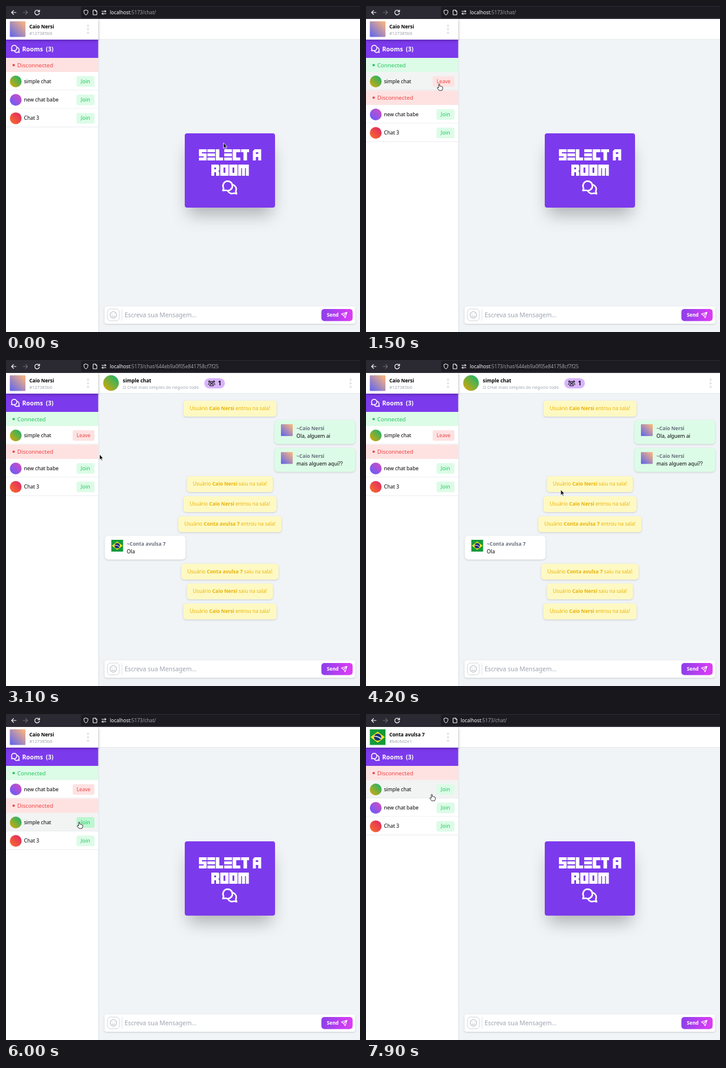
These frames come from a looping animation (600x553 px, 8 s). An HTML page:

```html
<!DOCTYPE html>
<html lang="pt">
<head>
<meta charset="utf-8">
<title>Chat rooms</title>
<style>
html, body { margin: 0; width: 100%; height: 100%; overflow: hidden; background: #f1f5f8 }
svg { display: block; width: 100vw; height: 100vh; font-family: "Noto Sans", "Open Sans", sans-serif }
.b { font-weight: 700 }
.m { font-weight: 500 }
.mid { text-anchor: middle }
.line { fill: none; stroke-linecap: round; stroke-linejoin: round }
.raised { filter: drop-shadow(0 1px 1.5px rgba(0,0,0,.16)) }
.side { filter: drop-shadow(.5px 0 1.5px rgba(0,0,0,.16)) }
.over { filter: drop-shadow(0 2px 2.5px rgba(0,0,0,.25)) }
.glow { filter: blur(14px) }
</style>
</head>
<body>
<svg viewBox="0 0 600 553" preserveAspectRatio="none">
  <defs id="defs"></defs>
  <g id="scene"></g>
  <g id="cursor"></g>
</svg>
<script>
const $ = id => document.getElementById(id);
const LOOP = 8000, STEP = 100;
const GREEN = '#22c55e', MINT = '#dcfce7', RED = '#ef4444', PINK = '#fee2e2';
const GRAY = '#9ca3af', VIOLET = '#7c3aed', YELLOW = '#eab308';

const users = {
  caio: { name: 'Caio Nersi', id: '#127385b6' },
  conta: { name: 'Conta avulsa 7', id: '#b4c6d2e1' }
};
const rooms = {
  simple: { name: 'simple chat', about: 'O CHat mais simples do negocio todo', hash: '644eb9a0f05e841758cf7f25', pill: 336 },
  babe: { name: 'new chat babe', about: 'O mais novo chat do bagulho todo', hash: '6473cc69af9306aecf5c79ea', pill: 326 },
  third: { name: 'Chat 3' }
};

// [start, user, joined room, open room]
const states = [
  [0, 'caio'], [1200, 'caio', 'simple'], [2700, 'caio', 'simple', 'simple'],
  [4900, 'caio'], [5500, 'caio', 'babe'], [6500, 'caio', 'babe', 'babe'], [7400, 'conta']
];

// pointer stops: [time, x, y]
const stops = [
  [0, 368.5, 232], [200, 368.5, 232], [1000, 133, 128], [1300, 133, 128], [1500, 124, 132],
  [1800, 124, 132], [2100, 210, 198], [2500, 62, 127], [2700, 62, 127], [3100, 158.5, 160],
  [3500, 260, 230], [3900, 420, 342], [4200, 330, 220], [4600, 135, 128], [4900, 135, 128],
  [5300, 133, 157], [5600, 133, 157], [6000, 124, 183], [6300, 60, 127], [6500, 60, 127],
  [7000, 428.5, 202], [7300, 428.5, 202], [7400, 290, 190], [7900, 111.5, 136], [8000, 111.5, 136]
];

const rect = (x, y, w, h, fill, r = 0, cls = '') =>
  `<rect x="${x}" y="${y}" width="${w}" height="${h}" rx="${r}" fill="${fill}" class="${cls}"/>`;
const circle = (x, y, r, fill) => `<circle cx="${x}" cy="${y}" r="${r}" fill="${fill}"/>`;
const text = (x, y, s, size, fill, cls = '') =>
  `<text x="${x}" y="${y}" font-size="${size}" fill="${fill}" class="${cls}">${s}</text>`;
const line = (d, color, width = 1.2) => `<path class="line" d="${d}" stroke="${color}" stroke-width="${width}"/>`;
const at = (x, y, s, body) => `<g transform="translate(${x} ${y}) scale(${s})">${body}</g>`;
const bold = s => `<tspan class="b">${s}</tspan>`;

const gradient = (id, from, to, y1 = 1) =>
  `<linearGradient id="${id}" x1="0" y1="${y1}" x2="1" y2="0"><stop offset=".1" stop-color="${from}"/><stop offset=".9" stop-color="${to}"/></linearGradient>`;
$('defs').innerHTML = gradient('simple', '#cfa80c', '#1fb468') + gradient('babe', '#6a5cfa', '#cf4cc4') +
  gradient('third', '#f9692b', '#e02b62') + gradient('caio', '#6a6ae6', '#f2b183') +
  gradient('send', '#9340ea', '#d83cf5', 0);

const bubbles = (x, y, s) => at(x, y, s,
  line('M1.3 17 2.6 13.2A8 8 0 1 1 6.6 16.6ZM19 7.4A8 8 0 0 1 23.2 18.4L24.6 22.4 20 21.5A8 8 0 0 1 9.8 18', '#fff', 2.6));

const dots = x => [33.5, 39.5, 45.5].map(y => circle(x, y, 1.9, '#e3e4e8')).join('');

const flag = rect(0, 0, 20, 20, '#149a3a') + '<path d="M.8 10 10 3 19.2 10 10 17Z" fill="#fbe122"/>' +
  circle(10, 10, 4.6, '#18307c') + line('M6 9Q10 8.5 14 11.8', '#fff', 1);
const portrait = (who, x, y, size) =>
  at(x, y, size / 20, who === 'conta' ? flag : rect(0, 0, 20, 20, 'url(#caio)', 1));

function toolbar(user, open) {
  const x = user === 'caio' ? 176 : 160.5, ink = '#fbfbfe';
  return rect(0, 0, 600, 22, '#2b2a33') + rect(127, 1, 480, 19, '#1c1b22', 3) +
    line('M17 11H9.5M12.8 7.7 9.5 11 12.8 14.3', ink) +
    line('M29 11H36.5M33.2 7.7 36.5 11 33.2 14.3', '#6c6b74') +
    line('M56 8.6A4 4 0 1 0 56.7 12M56.9 6.8V9.6H54', ink) +
    line('M135.5 6.8 139 8.2C139 12 138 14 135.5 15.2 133 14 132 12 132 8.2Z', ink, 1) +
    line('M148 7H152L154 9V15H148ZM152 7V9H154', ink, 1) +
    (user === 'caio' ? line('M162.5 9H169.5M167.5 7.5 169.5 9 167.5 10.5M169.5 13H162.5M164.5 11.5 162.5 13 164.5 14.5', ink, 1) : '') +
    text(x, 13.7, `localhost<tspan fill="#a3a2aa">:5173/chat/${open ? rooms[open].hash : ''}</tspan>`, 8.2, ink);
}

// Rows of the side list with their tops
function layout(joined) {
  const rest = Object.keys(rooms).filter(k => k !== joined);
  const top = joined ? 168 : 112;
  return [...(joined ? [{ key: joined, y: 112, on: true }] : []),
    ...rest.map((key, i) => ({ key, y: top + i * 31.2 }))];
}

function strip(y, on) {
  const ink = on ? GREEN : RED;
  return rect(0, y, 156.3, 24.5, on ? MINT : PINK) + circle(13, y + 12.2, 2, ink) +
    text(19, y + 15.7, on ? 'Connected' : 'Disconnected', 9.6, ink, 'm');
}

function row({ key, y, on }, x, py) {
  const hover = x < 156 && py >= y && py < y + 31;
  const inButton = hover && x > 119 && x < 150 && py > y + 7 && py < y + 25;
  const [bx, w] = on ? [113, 37] : [119.5, 30.5];
  return rect(0, y, 156.3, 31.2, hover ? '#f2f3f3' : '#fff') + rect(0, y + 30.4, 156.3, .8, '#e5e7eb') +
    circle(16.5, y + 16, 10, `url(#${key})`) + text(30.5, y + 19, rooms[key].name, 8.55, '#000', 'm') +
    rect(bx, y + 7, w, 18, on ? PINK : inButton ? '#bbf7d0' : MINT, 3) +
    text(bx + w / 2, y + 19, on ? 'Leave' : 'Join', on ? 8.6 : 9, on ? RED : GREEN, 'm mid');
}

function sidebar(user, joined, x, y) {
  const u = users[user];
  return `<g class="side">${rect(0, 22, 156.3, 531, '#fff')}</g>` +
    rect(0, 56.5, 156.3, 31.5, VIOLET) + rect(0, 22, 156.3, 35, '#fff', 0, 'over') +
    portrait(user, 6.5, 26, 26.5) + text(39.5, 38, u.name, 8.25, '#000', 'b') +
    text(39.5, 48.7, u.id, 7.4, GRAY) + dots(139) + bubbles(8.5, 66, .57) +
    text(27.5, 76.6, 'Rooms', 10.4, '#fff', 'b') + text(67.5, 76.6, '(3)', 10.4, '#fff', 'b') +
    (joined ? strip(88, true) + strip(143.3) : strip(88)) +
    layout(joined).map(r => row(r, x, y)).join('');
}

const glyphs = {
  S: 'M0 0H13V5H5V7H13V19H0V14H8V12H0Z',
  E: 'M0 0H13V5H0ZM0 7H13V12H0ZM0 14H13V19H0Z',
  L: 'M0 0H6V14H12.5V19H0Z',
  C: 'M0 0H13V5H6V14H13V19H0Z',
  T: 'M0 0H13.5V5H10V19H4V5H0Z',
  A: 'M3 0H14V19H9V13H5V19H0V3ZM5 5V8H9V5Z',
  R: 'M0 0H12L13.5 2V9L12 11 13.5 13V19H8V13H5V19H0ZM5 5V8H8V5Z',
  O: 'M0 0H14V19H0ZM5.5 5V14H8.5V5Z',
  M: 'M0 0H18V19H13V6H11.5V19H6.5V6H5V19H0Z'
};
function blocks(word, x, y, pitch) {
  return `<g role="img" aria-label="${word}" fill="#fff">` +
    [...word].map((c, i) => `<path transform="translate(${x + i * pitch} ${y})" d="${glyphs[c]}"/>`).join('') + '</g>';
}

const card = () => rect(309, 242, 141, 112, 'rgba(0,0,0,.27)', 4, 'glow') + rect(303, 216, 153, 126, VIOLET, 4) +
  blocks('SELECT', 327, 243, 14.3) + blocks('A', 418.5, 243, 0) + blocks('ROOM', 348, 269, 15.2) +
  bubbles(366.3, 296, 1);

function notice(y, who, enters, w) {
  return rect(379.5 - w / 2, y, w, 27, '#fef9c3', 5, 'raised') +
    text(379.5, y + 16.4, `Usuário ${bold(users[who].name)} ${enters ? 'entrou' : 'saiu'} na sala!`, 8.4, YELLOW, 'mid');
}

function message(x, y, who, words) {
  const mine = who === 'caio';
  return rect(x, y, 137, 40.5, mine ? MINT : '#fff', 6, 'raised') + portrait(who, x + 11, y + 7, 20) +
    text(x + 37.3, y + 16.8, '~' + users[who].name, 8.4, '#6b7280', 'b') +
    text(x + 37.3, y + 29.8, words, 8.5, '#000', 'm');
}

function chat(open) {
  const first = notice(69, 'caio', true, 158);
  if (open === 'babe') return first;
  return first + message(455, 102, 'caio', 'Ola, alguem ai') + message(455, 149.3, 'caio', 'mais alguem aqui??') +
    notice(197, 'caio', false, 146) + notice(231, 'caio', true, 158) + notice(265, 'conta', true, 175) +
    message(167.5, 298, 'conta', 'Ola') + notice(345.5, 'conta', false, 165) +
    notice(379, 'caio', false, 146) + notice(413, 'caio', true, 158);
}

function heading(open) {
  const r = rooms[open], p = r.pill;
  return circle(178, 39, 13.2, `url(#${open})`) + text(198, 38, r.name, 8.35, '#000', 'b') +
    text(198, 48.5, r.about, 7.33, GRAY) + rect(p, 30.7, 35, 17.6, '#d8b4fe', 8.8) +
    at(p + 12.5, 39.3, 1, line('M-3 4.5V3.5Q-3 1.5 0 1.5T3 3.5V4.5ZM-5.5 2.5Q-5.5.5-3.5.5M5.5 2.5Q5.5.5 3.5.5', '#111', 1.1) +
      [[0, -1, 1.7], [-3.8, -2.8, 1.3], [3.8, -2.8, 1.3]].map(([x, y, r]) =>
        `<circle cx="${x}" cy="${y}" r="${r}" fill="none" stroke="#111" stroke-width="1.1"/>`).join('')) +
    text(p + 23.3, 43, '1', 10, '#000', 'b') + dots(584);
}

const composer = () => rect(167, 509.5, 425, 29.5, '#fff', 4, 'raised') +
  '<rect x="172" y="514" width="20" height="20" rx="5" fill="none" stroke="#d1d5db"/>' +
  line('M176.5 524A5.5 5.5 0 1 0 187.5 524 5.5 5.5 0 1 0 176.5 524M179.5 525.5Q182 528.5 184.5 525.5M180 522.3V522.4M184 522.3V522.4', '#b4b8be', 1.1) +
  rect(196, 514, .8, 20, '#d9dce1') + text(201, 528, 'Escreva sua Mensagem...', 10.4, GRAY) +
  rect(534.5, 514, 53, 20.5, 'url(#send)', 5) + text(543.7, 527.2, 'Send', 8.3, '#fff', 'b') +
  line('M578 519.5 568.5 522.5 572.3 525 574.8 529ZM578 519.5 572.3 525', '#fff', 1.1);

const arrow = '<path d="M0 0V9.5L2.2 7.5 3.7 10.8 5.2 10.1 3.7 6.9H6.6Z" fill="#111" stroke="#fff" stroke-width=".8"/>';
const hand = '<path d="M-.9 7V.8Q0-.7.9.8V4Q2 3.2 2.7 4.3 4 3.7 4.4 4.9 6 4.5 6 6.2V8.5L4.9 11.2H-.2L-3.3 7.3Q-3.3 5.7-2 6.2Z" fill="#fff" stroke="#222" stroke-width=".9" stroke-linejoin="round"/>';

function pointer(t) {
  const i = stops.findIndex(s => s[0] > t);
  const [t0, x0, y0] = stops[i - 1], [t1, x1, y1] = stops[i];
  const p = (t - t0) / (t1 - t0), e = p * p * (3 - 2 * p);
  return [x0 + (x1 - x0) * e, y0 + (y1 - y0) * e];
}

function draw(t) {
  const [, user, joined, open] = states.filter(s => s[0] <= t).pop();
  const [x, y] = pointer(t);
  const overRow = x < 156 && layout(joined).some(r => y >= r.y && y < r.y + 31);
  $('scene').innerHTML = rect(0, 0, 600, 553, '#f0f4f7') + rect(156, 22, 444, 34.5, '#fff') +
    rect(156, 56, 444, .8, '#e4e8ec') + (open ? heading(open) + chat(open) : card()) +
    composer() + sidebar(user, joined, x, y) + toolbar(user, open);
  $('cursor').innerHTML = at(x, y, 1, overRow ? hand : arrow);
}

const start = performance.now();
let shown = -1;
function tick() {
  const t = Math.floor((performance.now() - start) % LOOP / STEP) * STEP;
  if (t !== shown) draw(shown = t);
  requestAnimationFrame(tick);
}
tick();
</script>
</body>
</html>
```
